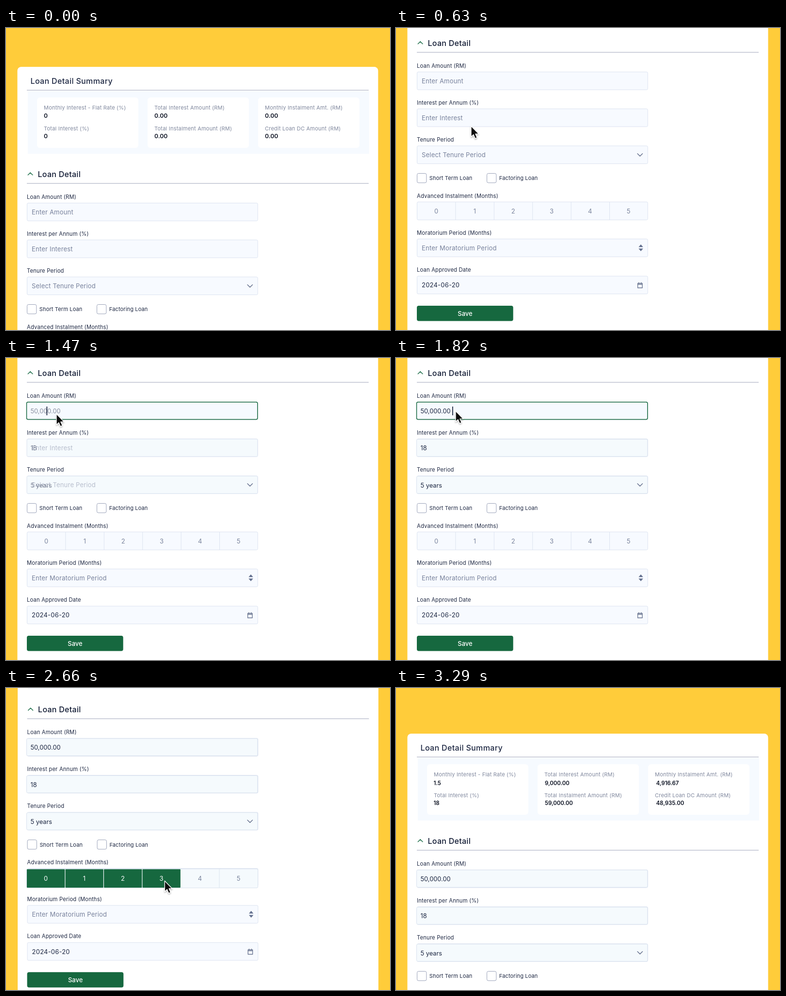
Write an HTML page that moves like this. It is 792x622 px and loops after 3.5 s.

```html
<!DOCTYPE html>
<html lang="en">
<head>
<meta charset="utf-8">
<title>Loan form</title>
<style>
  html, body { margin: 0; width: 100%; height: 100%; overflow: hidden; background: #ffcc3a; }
  svg { display: block; width: 792px; height: 622px; }
  text { font-family: Inter, "Open Sans", sans-serif; fill: #1d2742; white-space: pre; }
  .title { font-size: 16px; font-weight: 500; letter-spacing: .35px; }
  .head { font-size: 16px; font-weight: 500; letter-spacing: .27px; fill: #101a33; }
  .stat { font-size: 11px; letter-spacing: .22px; fill: #7f879d; }
  .zero { font-size: 12.2px; font-weight: 600; fill: #0c1222; }
  .total { font-size: 11.4px; font-weight: 600; fill: #0c1222; }
  .label { font-size: 11.2px; letter-spacing: .2px; }
  .check { font-size: 11px; letter-spacing: .15px; }
  .hint { font-size: 13px; letter-spacing: .2px; fill: #77819b; }
  .date { font-size: 13px; letter-spacing: .2px; }
  .value { font-size: 12.8px; }
  .digit { font-size: 13px; text-anchor: middle; fill: #7a849d; }
  .save { font-size: 13px; font-weight: 500; text-anchor: middle; fill: #fff; }
  .on { fill: #fff; }
  .field { fill: #f7faff; stroke: #dce3f0; }
  .filled { fill: #f5fafd; stroke: #d9e2ee; }
  .focus { fill: #f6faff; stroke: #16683f; stroke-width: 1.5; }
  .box { fill: #fff; stroke: #99a1b8; }
  .rule { fill: #b0b4c6; }
  .line { fill: none; stroke: #6a7591; stroke-width: 1.5; stroke-linecap: round; stroke-linejoin: round; }
  .green { fill: #16683f; }
  .white { fill: #fff; }
  .panel { fill: #f6faff; }
  .icon { fill: #63708f; }
  .divider { fill: #dce3f0; }
</style>
</head>
<body>
<svg viewBox="0 0 792 622">
  <defs>
    <filter id="shade" x="-50%" y="-50%" width="200%" height="200%">
      <feDropShadow dx="0" dy="2" stdDeviation="1.5" flood-opacity=".3"/>
    </filter>
  </defs>
  <g id="page">
    <g id="base"></g>
    <g id="zeros"></g>
    <g id="totals"></g>
    <g id="filled"></g>
    <g id="focus"></g>
    <g id="typed"></g>
    <g id="picked"></g>
    <rect id="caret" width="1.7" height="18" y="100" fill="#16203a"/>
    <path id="cursor" d="M0 0V22L4.9 17.5 8.3 25.4 12.2 23.7 8.8 16H15.6Z"
      fill="#0b0b0b" stroke="#fff" stroke-width="1.3" stroke-linejoin="round" filter="url(#shade)"/>
  </g>
</svg>
<script>
const LOOP = 3500, STEP = 70, LAST = 3290, TOP = 284;
const el = id => document.getElementById(id);
const add = (group, markup) => { group.innerHTML += markup; };
const text = (cls, x, y, s) => `<text class="${cls}" x="${x}" y="${y}">${s}</text>`;
const rect = (cls, x, y, w, h, r = 0) =>
  `<rect class="${cls}" x="${x}" y="${y}" width="${w}" height="${h}" rx="${r}"/>`;
const path = (cls, d, style = '') => `<path class="${cls}" d="${d}" style="${style}"/>`;

const [base, zeros, totals, filled, focus, typed, picked, caret, cursor, page] =
  ['base', 'zeros', 'totals', 'filled', 'focus', 'typed', 'picked', 'caret', 'cursor', 'page'].map(el);
const chevron = path('line', 'M498 258.7l5.2 5.2 5.2-5.2');

function drawSummary() {
  const stats = [
    [64, 'Monthly Interest - Flat Rate (%)', 'Total Interest (%)', '0', 77.5, '1.5', '18'],
    [292, 'Total Interest Amount (RM)', 'Total Instalment Amount (RM)', '0.00', 307, '9,000.00', '59,000.00'],
    [520, 'Monthly Instalment Amt. (RM)', 'Credit Loan DC Amount (RM)', '0.00', 536.5, '4,916.67', '48,935.00']
  ];
  add(base, rect('white', 23.5, -190, 744, 900, 8)
    + text('title', 50.5, -155.3, 'Loan Detail Summary')
    + rect('rule', 43, -142.5, 705, 1.2)
    + rect('panel', 45, -140, 704, 129));
  for (const [x, top, low, zero, tx, a, b] of stats) {
    add(base, rect('white', x, -127, 209, 104, 6)
      + text('stat', x + 14, -102, top) + text('stat', x + 14, -59.4, low));
    add(zeros, text('zero', x + 14, -85.2, zero) + text('zero', x + 14, -42.6, zero));
    add(totals, text('total', tx, -84.4, a) + text('total', tx, -43, b));
  }
}

function drawForm() {
  add(base, path('line', 'M45.3 32.8l4.8-4.8 4.8 4.8', 'stroke:#1b6e48')
    + text('head', 65.5, 36.8, 'Loan Detail')
    + rect('rule', 43, 49.5, 705, 1.2));

  const fields = [
    [90.5, 'Loan Amount (RM)', 'Enter Amount', 'hint'],
    [166.5, 'Interest per Annum (%)', 'Enter Interest', 'hint'],
    [242.8, 'Tenure Period', 'Select Tenure Period', 'hint'],
    [434.5, 'Moratorium Period (Months)', 'Enter Moratorium Period', 'hint'],
    [511, 'Loan Approved Date', '2024-06-20', 'date']
  ];
  for (const [y, label, inside, cls] of fields)
    add(base, text('label', 43, y - 9, label)
      + rect('field', 43.5, y, 475.7, 36.7, 2.5) + text(cls, 53, y + 23.3, inside));
  add(base, chevron);

  for (const [x, name] of [[43.5, 'Short Term Loan'], [187.5, 'Factoring Loan']])
    add(base, rect('box', x, 299.5, 19.3, 19.3, 3) + text('check', x + 25.3, 313.3, name));

  add(base, text('label', 43, 350, 'Advanced Instalment (Months)')
    + rect('field', 43.5, 358.2, 475.7, 37, 2.5));
  for (let i = 0; i < 6; i++) {
    if (i) add(base, rect('divider', 43 + i * 79.4, 358.2, 1, 37));
    add(base, text('digit', 83 + i * 79.3, 381.8, i));
  }

  add(base, path('icon', 'M500.3 451.2l4.7-5.4 4.7 5.4zM500.3 454.3l4.7 5.4 4.7-5.4z')
    + path('line', 'M498.6 526h9.4v9.2h-9.4zM498.6 528h9.4M500.8 524.2v1.6M505.8 524.2v1.6', 'stroke-width:1.4')
    + rect('green', 43, 572, 198.7, 31.5, 4)
    + text('save', 142.5, 592.7, 'Save'));
}

function drawStates() {
  add(filled, rect('filled', 42.5, 90.8, 476.3, 35.6, 2.5)
    + rect('filled', 42.5, 167.2, 476.3, 35.6, 2.5)
    + rect('filled', 42.5, 243.4, 476.3, 35.6, 2.5) + chevron
    + text('value', 50.5, 190.4, '18') + text('value', 50.5, 266.7, '5 years'));
  add(focus, rect('focus', 42.5, 90.8, 476.3, 35.6, 3));
  add(typed, text('value', 50.5, 113.8, '50,000.00'));

  add(picked, rect('filled', 42.5, 359.5, 477, 39, 2.5));
  for (let i = 0; i < 6; i++) {
    const on = i < 4;
    add(picked, (on ? rect('green', 43 + i * 79.5, 360, 78.3, 38, 1) : '')
      + text(on ? 'digit on' : 'digit', 82 + i * 79.5, 384, i));
  }
  add(picked, rect('divider', 439.5, 360, 1, 38));
}

// Eased progress from 0 to 1 between two times
function ease(t, from, to) {
  const p = Math.min(1, Math.max(0, (t - from) / (to - from)));
  return p < .5 ? 2 * p * p : 1 - 2 * (1 - p) ** 2;
}
const mix = (a, b, p) => a + (b - a) * p;
const fade = (node, v) => node.setAttribute('opacity', v);

function render(t) {
  const down = ease(t, -73, 392), up = ease(t, 2589, 3054);
  const enter = ease(t, 420, 820), fill = ease(t, 1330, 1610);
  const leave = ease(t, 1890, 2210);
  const focused = ease(t, 820, 960) * (1 - ease(t, 1890, 2030));
  const moving = down < 1 && t > 0 || up > 0 && up < 1;

  page.setAttribute('transform', `translate(0 ${TOP * (1 - down + up)})`);
  base.setAttribute('transform', `translate(${moving ? .6 : 0} 0)`);
  fade(zeros, t < 1330 ? 1 : 0);
  fade(totals, t < 1330 ? 0 : 1);
  fade(filled, fill);
  fade(typed, fill);
  fade(focus, focused);
  fade(caret, focused);
  fade(picked, ease(t, 2228, 2510));
  fade(cursor, ease(t, 420, 560));
  caret.setAttribute('x', mix(51, 116, fill));

  const x = mix(mix(mix(240, 85, enter), 123, fill), 327.3, leave);
  const y = mix(mix(mix(300, 121.5, enter), 109.3, fill), 384, leave);
  cursor.setAttribute('transform', `translate(${x} ${y})`);
}

drawSummary();
drawForm();
drawStates();

const start = performance.now();
function tick() {
  const t = Math.max(0, performance.now() - start) % LOOP;
  render(Math.min(LAST, Math.floor(t / STEP) * STEP));
  requestAnimationFrame(tick);
}
tick();
</script>
</body>
</html>
```
